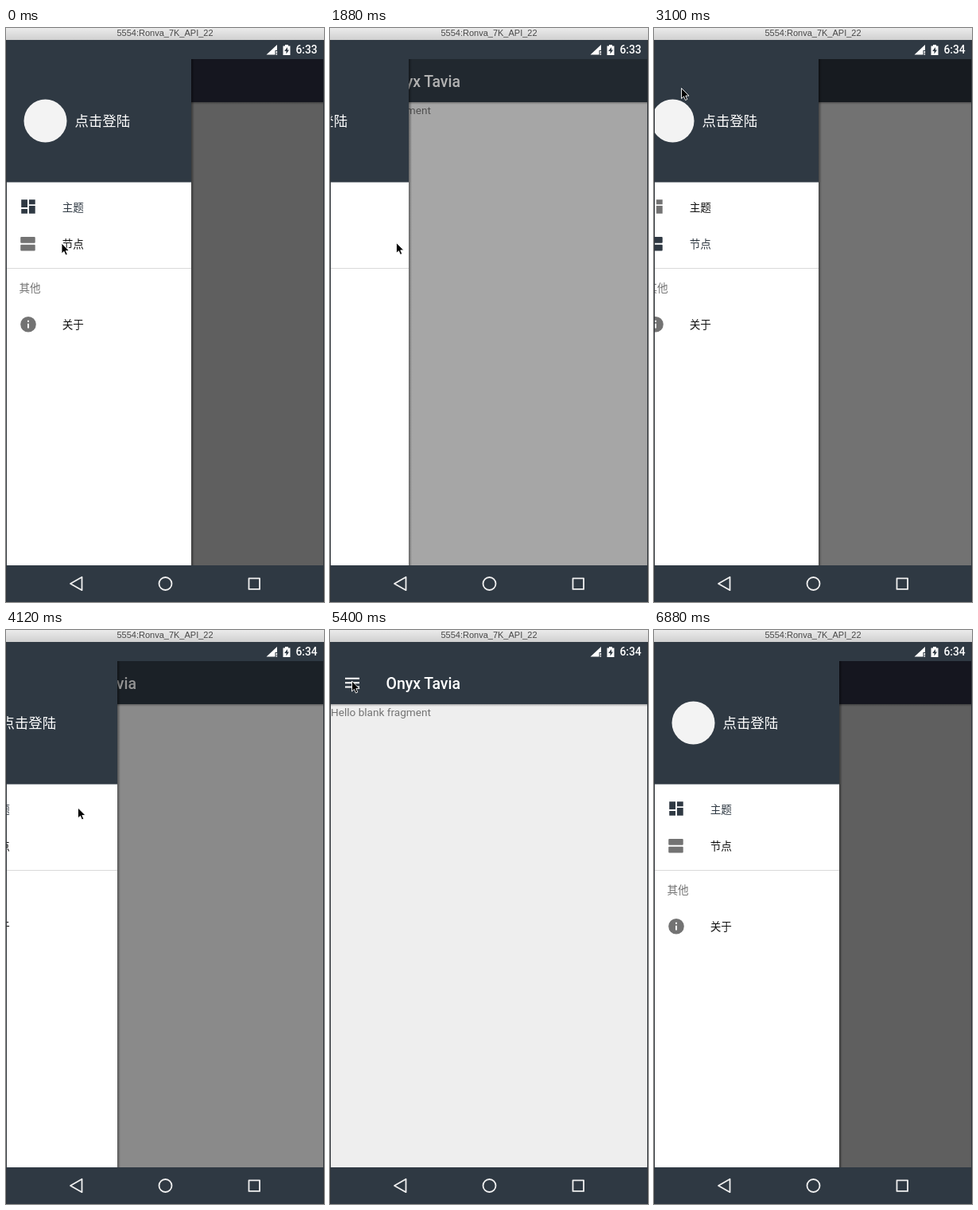
Write an HTML page that moves like this. It is 400 px wide and 720 px high and loops after 7.18 s.

```html
<!DOCTYPE html>
<html lang="zh">
<head>
<meta charset="utf-8">
<style>
  html, body { margin: 0; width: 100%; height: 100%; overflow: hidden; background: #eee; }
  svg { display: block; width: 400px; height: 720px; font-family: Roboto, "Noto Sans CJK SC", "Noto Sans CJK", sans-serif; }
  .bar { fill: #2f3943; }
  .white { fill: #fff; }
  .item { font-size: 13.6px; fill: #111; }
  .icon, .muted { fill: #737373; }
  .selected .icon, .selected .item { fill: #2f3943; }
  .nav { fill: none; stroke: #f0f0f0; stroke-width: 1.8; stroke-linejoin: round; }
</style>
</head>
<body>
<svg viewBox="0 0 400 720">
  <defs>
    <linearGradient id="chrome" x2="0" y2="1">
      <stop stop-color="#ebebeb"/><stop offset="1" stop-color="#d0d0d0"/>
    </linearGradient>
    <linearGradient id="sideShadow">
      <stop stop-opacity=".4"/><stop offset="1" stop-opacity="0"/>
    </linearGradient>
    <linearGradient id="barShadow" x2="0" y2="1">
      <stop stop-opacity=".3"/><stop offset="1" stop-opacity="0"/>
    </linearGradient>
  </defs>

  <!-- page -->
  <rect y="93" width="400" height="581" fill="#eee"/>
  <rect y="93" width="400" height="3" fill="url(#barShadow)"/>
  <text x="1" y="108" font-size="13.6" class="muted">Hello blank fragment</text>
  <rect id="toolbar" y="39" width="400" height="54"/>
  <path d="M19 60.8h18M19 66.2h18M19 71.6h18" stroke="#fff" stroke-width="2"/>
  <text x="70.5" y="73.5" font-size="19.45" font-weight="500" class="white">Onyx Tavia</text>
  <rect id="scrim" y="39" width="400" height="635"/>

  <!-- drawer -->
  <g id="drawer">
    <rect x="233" y="39" width="4" height="635" fill="url(#sideShadow)"/>
    <rect y="39" width="233" height="635" class="white"/>
    <rect y="30" width="233" height="163.5" class="bar"/>
    <circle cx="49.5" cy="116.5" r="27" fill="#f3f3f3"/>
    <text x="86.5" y="123" font-size="17.4" class="white">点击登陆</text>
    <g id="topics">
      <path class="icon" transform="translate(16.3 212.4) scale(.972)" d="M3 13h8V3H3zm0 8h8v-6H3zm10 0h8V11h-8zm0-18v6h8V3z"/>
      <text class="item" x="70.7" y="230">主题</text>
    </g>
    <g id="nodes">
      <path class="icon" transform="translate(16.3 259) scale(.972)" d="M20 13H3q-1 0-1 1v6q0 1 1 1h17q1 0 1-1v-6q0-1-1-1zm0-10H3q-1 0-1 1v6q0 1 1 1h17q1 0 1-1V4q0-1-1-1z"/>
      <text class="item" x="70.7" y="276">节点</text>
    </g>
    <rect y="301" width="233" height="1" fill="#dadada"/>
    <text x="16.5" y="331" font-size="13.6" class="muted">其他</text>
    <circle class="icon" cx="28" cy="371.7" r="9.8"/>
    <path d="M27 366.8h2v2h-2zm0 4h2v5.8h-2z" class="white"/>
    <text class="item" x="70.7" y="377">关于</text>
  </g>

  <!-- system bars -->
  <rect y="15" width="400" height="24" class="bar"/>
  <path d="M341 21v7h-2.5v5.5H327.5z M339.5 29h1.6v2.6h-1.6z M339.5 32.3h1.6v1.5h-1.6z" class="white"/>
  <path d="M348.5 22.5h2.5V21h4v1.5h2.5V34h-9z" class="white"/>
  <path d="M354 24l-3.8 5h2.3v3.5l3.6-5h-2.1z" class="bar"/>
  <text id="clock" x="364.5" y="32" font-size="13.8" font-weight="500" class="white"></text>
  <rect y="674" width="400" height="46" class="bar"/>
  <path class="nav" d="M81 697l14.5-8.2v16.4z"/>
  <circle class="nav" cx="200.5" cy="697" r="8"/>
  <rect class="nav" x="305.5" y="690.3" width="13.6" height="13.6"/>

  <!-- window -->
  <path d="M.5 15v705M399.5 15v705" stroke="#30353a"/>
  <rect width="400" height="15" fill="url(#chrome)"/>
  <text x="200" y="10" font-size="11" fill="#484848" text-anchor="middle" style="font-family: 'Liberation Sans', Arial, sans-serif">5554:Ronva_7K_API_22</text>

  <path id="cursor" d="M0 0v13l3-2.7 2 4.7 2.3-1-2-4.5h4.2z" stroke="#fff" stroke-width=".9"/>
</svg>
<script>
const LOOP = 7180, STEP = 20, SLIDE = 680, DRAWER_WIDTH = 233;

// Drawer slides: first visible time, nominal start, final openness
const slides = [
  [1800, 1773, 0], [2880, 2859, 1], [4080, 4054, 0], [5760, 5740, 1]
];

// Pointer rests: time, x, y
const pointer = [
  [580, 70, 270], [780, 84, 271.5], [1840, 84, 271.5], [2490, 34.5, 75.5],
  [3180, 34.5, 75.5], [3500, 88, 219], [3600, 88, 219], [3700, 90.5, 223],
  [4130, 90.5, 223], [5110, 27.5, 64], [6460, 27.5, 64], [6880, 404, -18]
];

const el = id => document.getElementById(id);
const [toolbar, scrim, drawer, topics, nodes, clock, cursor] =
  ['toolbar', 'scrim', 'drawer', 'topics', 'nodes', 'clock', 'cursor'].map(el);

function openness(t) {
  const slide = slides.findLast(([shown]) => t >= shown);
  if (!slide) return 1;
  const [, start, to] = slide;
  const progress = 1 - (1 - Math.min(1, (t - start) / SLIDE)) ** 5;
  return to ? progress : 1 - progress;
}

function pointerAt(t) {
  const next = pointer.findIndex(([time]) => t < time);
  if (next === 0) return pointer[0].slice(1);
  if (next < 0) return pointer.at(-1).slice(1);
  const [t0, x0, y0] = pointer[next - 1], [t1, x1, y1] = pointer[next];
  const u = (t - t0) / (t1 - t0), k = u * u * (3 - 2 * u);
  return [x0 + (x1 - x0) * k, y0 + (y1 - y0) * k];
}

function draw(now) {
  const t = Math.floor(now % LOOP / STEP) * STEP;
  const open = openness(t), dim = 0.6 * openness(t - STEP);
  const nodesSelected = t >= 1800 && t < 4080;

  drawer.setAttribute('transform', `translate(${Math.round((open - 1) * DRAWER_WIDTH)})`);
  drawer.setAttribute('visibility', open > 0.002 ? 'visible' : 'hidden');
  scrim.setAttribute('opacity', dim);
  toolbar.setAttribute('fill', dim > 0.595 ? '#35364d' : '#2f3943');
  topics.setAttribute('class', nodesSelected ? '' : 'selected');
  nodes.setAttribute('class', nodesSelected ? 'selected' : '');
  clock.textContent = t < 2000 ? '6:33' : '6:34';
  cursor.setAttribute('transform', `translate(${pointerAt(t)})`);
}

function tick() {
  draw(performance.now());
  requestAnimationFrame(tick);
}
tick();
</script>
</body>
</html>
```
